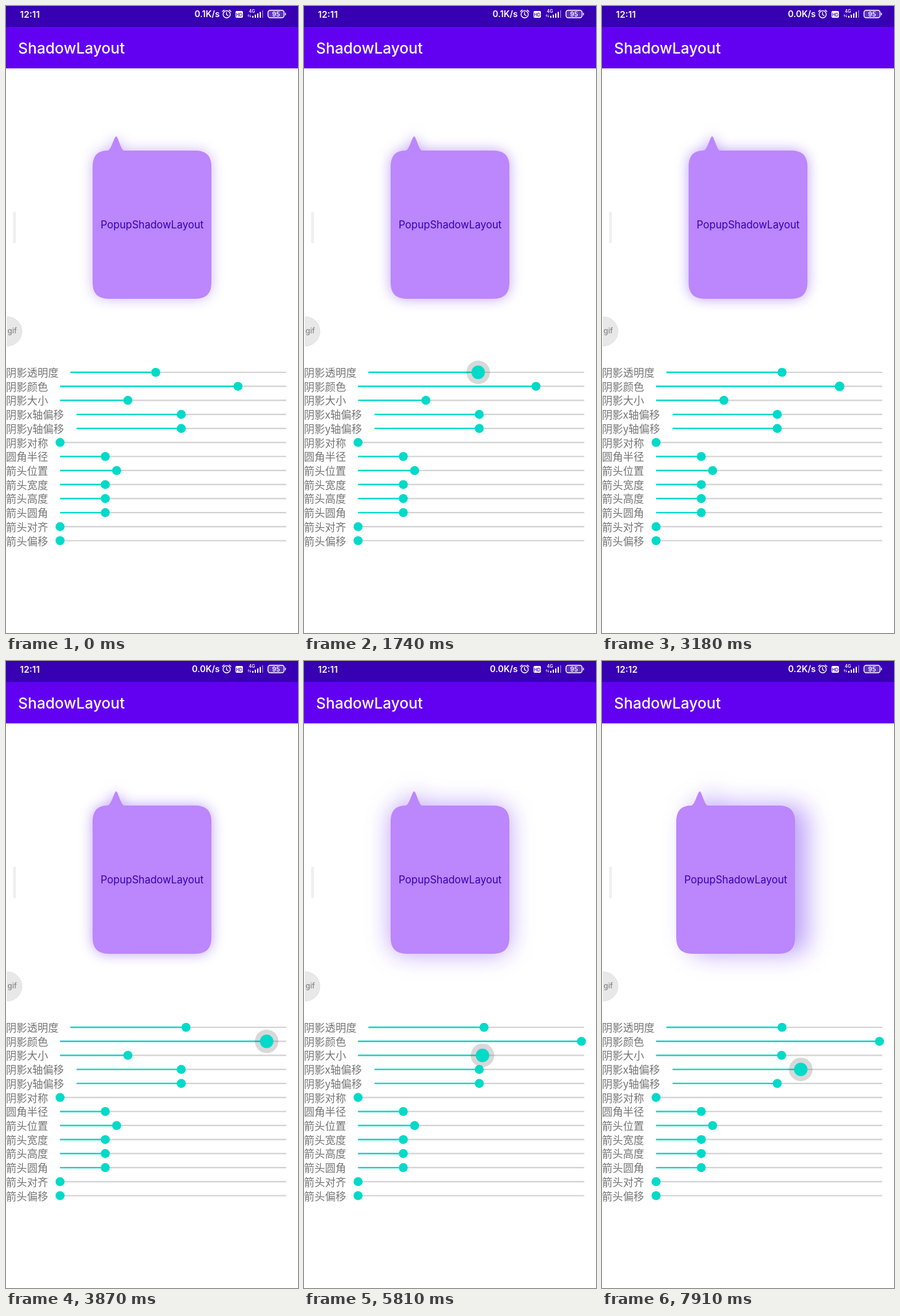
Recreate the animation shown at these times as an HTML page. Size 472 by 1015 pixels, loop 8 s.

```html
<!DOCTYPE html>
<html lang="zh">
<head>
<meta charset="utf-8">
<title>ShadowLayout</title>
<style>
  html, body { margin: 0; width: 100%; height: 100%; overflow: hidden; background: #fff; }
  svg { display: block; width: 472px; height: 1015px; }
  .status { font: 600 14px Inter, sans-serif; fill: #fff; }
  .title { font: 500 24.4px Inter, sans-serif; fill: #fff; }
  .popup { font: 16.6px Inter, sans-serif; fill: #3300b8; text-anchor: middle; }
  .label { font: 17px "Noto Sans CJK SC", "Noto Sans CJK", sans-serif; fill: #747474; }
</style>
</head>
<body>
<svg viewBox="0 0 472 1015">
  <defs>
    <filter id="blur" filterUnits="userSpaceOnUse" x="40" y="110" width="400" height="470" color-interpolation-filters="sRGB">
      <feGaussianBlur id="blurSize" stdDeviation="9"/>
    </filter>
    <path id="bubble" d="M164 234C170 234 175 211 178 211S186 234 191 234H306Q332 234 332 260V448Q332 474 306 474H166Q140 474 140 448V260Q140 234 164 234Z"/>
  </defs>

  <rect width="472" height="34.5" fill="#3700b3"/>
  <rect y="34" width="472" height="67" fill="#6200f2"/>
  <text class="title" x="19.5" y="77">ShadowLayout</text>

  <g class="status">
    <text id="clock" x="22.5" y="18.5" style="font-size:14.5px"></text>
    <text id="speed" x="345.5" y="18" text-anchor="end"></text>
    <g fill="none" stroke="#fff" stroke-width="1.4" stroke-linecap="round">
      <circle cx="356.7" cy="13.5" r="5.8"/>
      <path d="M356.5 10.5V14L359 15.5M349.8 9L352.6 6.6M363.6 9L360.8 6.6"/>
      <rect x="423.5" y="7" width="26" height="12" rx="3.5" fill="#fff" fill-opacity=".2"/>
      <path d="M451.7 11.5V14.5"/>
    </g>
    <rect x="371" y="8" width="12" height="11" rx="2"/>
    <text x="377" y="16.5" text-anchor="middle" style="font-size:7px;fill:#3700b3">HD</text>
    <text x="392.5" y="11" style="font-size:7px">4G</text>
    <path d="M392 18V14M390.8 15.5L392 14L393.2 15.5M395 14V18M393.9 16.6L395 18L396.1 16.6" fill="none" stroke="#fff" stroke-width=".7"/>
    <path d="M398 16H400V19H398ZM402 14H404V19H402ZM406 12H408V19H406ZM410 9.5H412V19H410Z"/>
    <path d="M414 7H415.5V19H414Z" opacity=".45"/>
    <text x="436.5" y="16.8" text-anchor="middle" style="font-size:10px">95</text>
  </g>

  <use id="shadow" href="#bubble" fill="#8450f4" filter="url(#blur)"/>
  <g id="card">
    <use href="#bubble" fill="#bc86fd"/>
    <text class="popup" x="236.3" y="360">PopupShadowLayout</text>
  </g>

  <rect x="11.5" y="333" width="4.5" height="51" rx="2" fill="#efefef"/>
  <path d="M2 503A23.7 23.7 0 0 1 2 550.5Z" fill="#e8e8e8" stroke="#dedede" stroke-width=".8"/>
  <text x="2.5" y="530" style="font:500 12px Inter,sans-serif;fill:#858585">gif</text>
  <g id="rows"></g>
</svg>

<script>
const LOOP = 8000, TRACK_END = 453;
const $ = id => document.getElementById(id);

// keys: [time, thumb x]; press: [finger down, finger up]
const rows = [
  { label: "阴影透明度", start: 104, keys: [[490, 242], [900, 401], [1250, 339], [1740, 281.5], [1900, 291]], press: [450, 2400] },
  { label: "阴影颜色", keys: [[3000, 375], [3180, 384], [3770, 420], [4540, 430], [4640, 448.5]], press: [3130, 4640] },
  { label: "阴影大小", keys: [[5120, 197], [5810, 288.5], [5910, 290.3]], press: [5080, 6450] },
  { label: "阴影x轴偏移", start: 114, keys: [[7250, 283.3], [7910, 321.3]], press: [7220, 9000] },
  { label: "阴影y轴偏移", start: 114, x: 283.3 },
  { label: "阴影对称", x: 87.4 },
  { label: "圆角半径", x: 160.5 },
  { label: "箭头位置", x: 178.8 },
  { label: "箭头宽度", x: 160.5 },
  { label: "箭头高度", x: 160.5 },
  { label: "箭头圆角", x: 160.5 },
  { label: "箭头对齐", x: 87.4 },
  { label: "箭头偏移", x: 87.4 }
];

function add(tag, attrs, text = "") {
  const node = document.createElementNS("http://www.w3.org/2000/svg", tag);
  set(node, attrs);
  node.textContent = text;
  $("rows").append(node);
  return node;
}

function set(node, attrs) {
  for (const name in attrs) node.setAttribute(name, attrs[name]);
}

const clamp = v => Math.min(1, Math.max(0, v));

function valueAt(keys, t) {
  let [t0, v0] = keys[0];
  for (const [t1, v1] of keys) {
    if (t < t1) return t <= t0 ? v0 : v0 + (v1 - v0) * (t - t0) / (t1 - t0);
    [t0, v0] = [t1, v1];
  }
  return v0;
}

function pressAt([down, up], t) {
  const p = clamp((t - down) / 250) * (1 - clamp((t - up) / 200));
  return p * p * (3 - 2 * p);
}

rows.forEach((row, i) => {
  const y = 593 + i * 22.71;
  row.start ??= 87.4;
  add("text", { class: "label", x: 0, y: y + 7 }, row.label);
  add("path", { d: `M${row.start} ${y}H${TRACK_END}`, stroke: "#d2d2d2", "stroke-width": 2.2 });
  row.bar = add("path", { stroke: "#00dac8", "stroke-width": 2.4 });
  row.halo = add("circle", { cy: y, fill: "#666" });
  row.thumb = add("circle", { cy: y, fill: "#00dac8" });
  row.y = y;
});

function drawRow(row, t) {
  const x = row.keys ? valueAt(row.keys, t) : row.x;
  const p = row.press ? pressAt(row.press, t) : 0;
  set(row.bar, { d: `M${row.start} ${row.y}H${x}` });
  set(row.halo, { cx: x, r: 7 + 12 * p, opacity: 0.25 * Math.min(1, p * 2) });
  set(row.thumb, { cx: x, r: 7.3 + 3.6 * p });
  row.now = x;
  row.part = (x - row.start) / (TRACK_END - row.start);
}

function draw(t) {
  rows.forEach(row => drawRow(row, t));
  const [alpha, , size, shift] = rows;
  set($("shadow"), { opacity: alpha.part });
  set($("blurSize"), { stdDeviation: 35 * size.part });
  set($("card"), { transform: `translate(${(283.3 - shift.now) * 20 / 38} 0)` });
  $("clock").textContent = t < 7600 ? "12:11" : "12:12";
  $("speed").textContent = t < 1990 ? "0.1K/s" : t < 6500 ? "0.0K/s" : "0.2K/s";
}

const began = performance.now();
function tick() {
  draw((performance.now() - began) % LOOP);
  requestAnimationFrame(tick);
}
tick();
</script>
</body>
</html>
```
